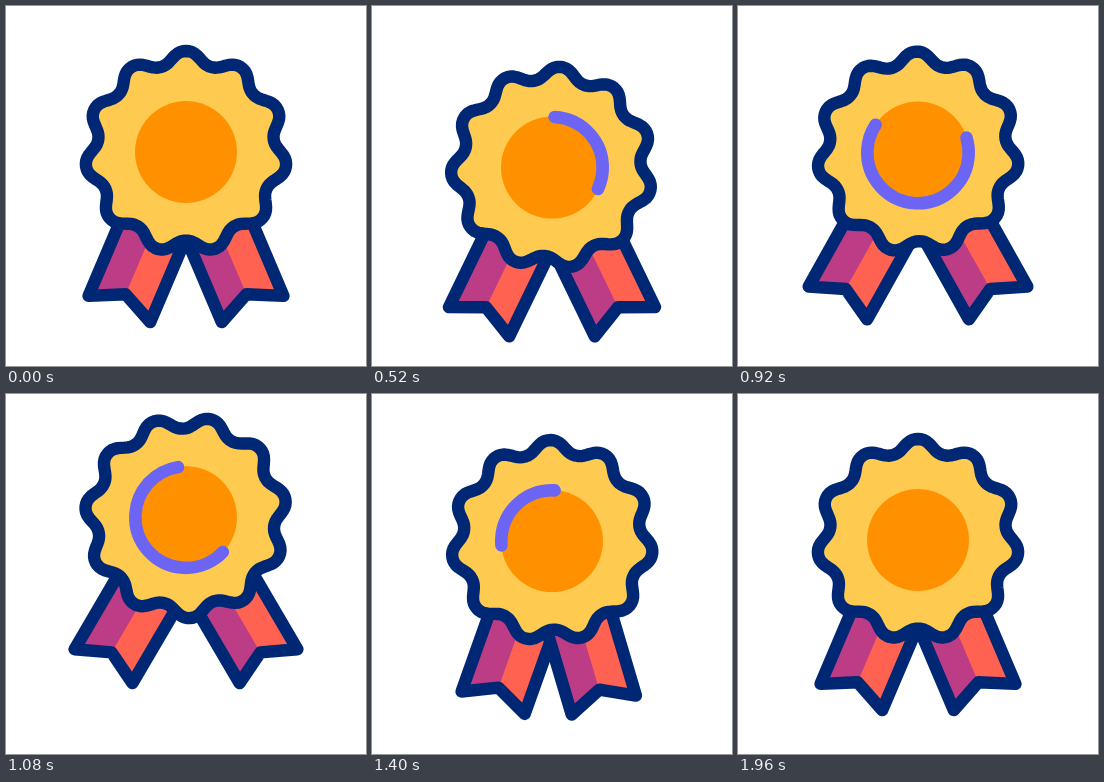
An HTML page for the animation above (2000 ms loop, 360 by 360 pixels).

```html
<!DOCTYPE html>
<html lang="en">
<head>
<meta charset="utf-8">
<title>Award rosette</title>
<style>
  html, body { margin: 0; width: 100%; height: 100%; overflow: hidden; background: #fff; }
  svg { display: block; width: 100vw; height: 100vh; }
  .line { fill: none; stroke: #002774; stroke-width: 12.4; stroke-linejoin: round; stroke-linecap: round; }
  .dark { fill: #bd3c86; }
  .light { fill: #ff6250; }
  #arc { fill: none; stroke: #6c65f4; stroke-width: 12.6; stroke-linecap: round; }
</style>
</head>
<body>
<svg viewBox="0 0 360 360">
  <defs>
    <g id="ribbon">
      <path class="dark" d="M-33.5 10H33.5V138.5L0 122.5L-33.5 138.5Z"/>
      <path class="light" d="M33.5 10H0V122.5L33.5 138.5Z"/>
      <path class="line" d="M-33.5 10V138.5L0 122.5L33.5 138.5V10Z"/>
    </g>
  </defs>
  <g id="award">
    <use id="left" href="#ribbon"/>
    <use id="right" href="#ribbon"/>
    <g id="badge">
      <path id="face" class="line" style="fill:#fecb50"/>
    </g>
    <circle r="51" fill="#ff9100"/>
    <circle id="arc" r="50.7" pathLength="1" transform="rotate(-87)"/>
  </g>
</svg>
<script>
const LOOP = 2000;
const $ = id => document.getElementById(id);

// Smooth curve through [time, value] points that never overshoots them.
function track(points) {
  const slope = i => (points[i + 1][1] - points[i][1]) / (points[i + 1][0] - points[i][0]);
  const tangents = points.map((_, i) => {
    if (i === 0 || i === points.length - 1) return 0;
    const a = slope(i - 1), b = slope(i);
    return a * b <= 0 ? 0 : 2 * a * b / (a + b);
  });
  return t => {
    const last = points.length - 1;
    if (t <= points[0][0]) return points[0][1];
    if (t >= points[last][0]) return points[last][1];
    const i = points.findIndex(p => p[0] > t) - 1;
    const [t0, v0] = points[i], [t1, v1] = points[i + 1];
    const d = t1 - t0, u = (t - t0) / d, ease = u * u * (3 - 2 * u);
    return v0 + (v1 - v0) * ease
      + d * u * (1 - u) * ((1 - u) * tangents[i] - u * tangents[i + 1]);
  };
}

const height = track([[200, 146], [320, 149], [720, 170.6], [920, 146.7], [1115, 121.8], [1240, 131], [1560, 156.7], [1960, 146]]);
const spin = track([[200, 0], [320, 4], [720, 92], [920, 162.6], [1240, 252.8], [1600, 331.5], [1960, 360]]);
const swing = low => track([[320, 23], [560, 26.5], [720, 28.8], [920, 29.2], [1100, 30.4], [1240, 27.3], [1600, low], [1960, 23]]);
const leftSwing = swing(12.3);
const rightSwing = swing(5.4);
const drop = track([[1240, 0], [1600, 4], [1960, 0]]);
const arcStart = track([[560, 0], [1840, 1]]);
const arcEnd = track([[120, 0], [1200, 1]]);

// Wavy outline; the third harmonic rounds the crests and steepens the sides.
function scallop(lobes, radius, depth) {
  const steps = lobes * 20;
  let d = "";
  for (let i = 0; i < steps; i++) {
    const a = i / steps * 2 * Math.PI;
    const wave = Math.cos(lobes * a) - 0.04 * Math.cos(3 * lobes * a);
    const r = radius + depth * wave;
    d += (i ? "L" : "M") + (r * Math.sin(a)).toFixed(2) + " " + (-r * Math.cos(a)).toFixed(2);
  }
  return d + "Z";
}
$("face").setAttribute("d", scallop(11, 94.8, 6.45));

function draw(t) {
  const place = (id, value) => $(id).setAttribute("transform", value);
  const hang = 29.5 + drop(t);
  place("award", `translate(180 ${height(t)})`);
  place("badge", `rotate(${spin(t)})`);
  place("left", `translate(-12.5 ${hang}) rotate(${leftSwing(t)})`);
  place("right", `translate(12.5 ${hang}) rotate(${-rightSwing(t)})`);

  const from = arcStart(t), length = arcEnd(t) - from, arc = $("arc");
  arc.style.display = length > 0.001 ? "" : "none";
  arc.setAttribute("stroke-dasharray", `${length} 2`);
  arc.setAttribute("stroke-dashoffset", -from);
}

const begin = performance.now();
function tick() {
  draw((performance.now() - begin) % LOOP);
  requestAnimationFrame(tick);
}
draw(0);
requestAnimationFrame(tick);
</script>
</body>
</html>
```
